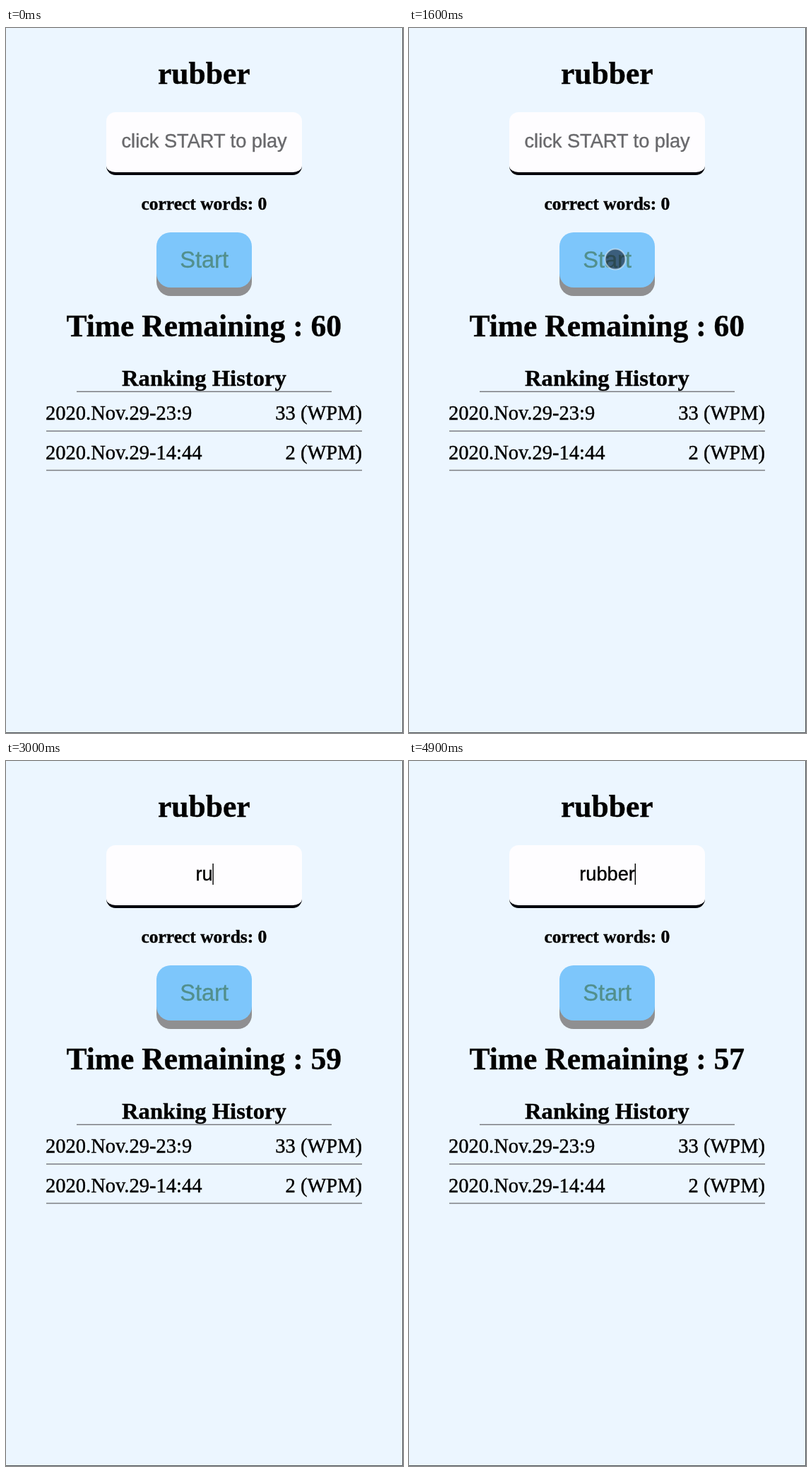
Animation of 562x997 px, one loop 5 s. Source, as an HTML page:

```html
<!DOCTYPE html>
<html lang="en">
<head>
<meta charset="utf-8">
<title>Typing game</title>
<style>
  html, body { margin: 0; width: 100%; height: 100%; overflow: hidden; background: #ecf6ff; }
  div, svg { position: absolute; box-sizing: border-box; }
  svg { left: 0; top: 0; }
  #field { left: 142px; top: 119px; width: 277px; height: 89px; border-radius: 13px;
    background: #fefdff; border-bottom: 4px solid #000008; }
  #button { left: 213px; top: 289px; width: 135px; height: 78px; border-radius: 20px;
    background: #7dc6fb; box-shadow: 0 12px #8f8f91; }
  #button.pressed { transform: translateY(5.4px); box-shadow: 0 6.6px #666; }
  text { font-family: "Liberation Serif", "Times New Roman", serif;
    fill: currentColor; stroke: currentColor; stroke-width: .4; }
  .bold { font-weight: bold; }
  .mid { text-anchor: middle; }
  .end { text-anchor: end; }
  .sans { font-family: "Liberation Sans", Arial, sans-serif; }
  .row { font-size: 28.5px; }
  .rule { stroke: #7c7e82; stroke-width: 1.4; }
</style>
</head>
<body>
<div id="field"></div>
<div id="button"></div>
<svg width="562" height="997" viewBox="0 0 562 997">
  <text class="bold mid" x="280.3" y="78.7" font-size="43.5">rubber</text>
  <text class="sans mid" id="typed" x="280.6" y="169.3" font-size="27.2"></text>
  <rect id="caret" width="1.4" height="30"/>
  <text class="bold mid" x="280.4" y="257" font-size="25.5">correct words: 0</text>
  <text class="sans mid" id="label" x="280.6" y="339" font-size="32.6" color="#528f8c">Start</text>
  <text class="bold mid" id="timer" x="280.3" y="436.2" font-size="43.5"></text>
  <text class="bold mid" x="280.4" y="505.7" font-size="32.6">Ranking History</text>
  <path class="rule" d="M100 514.2H461M57 570H504M57 625.5H504"/>
  <g class="row">
    <text x="56" y="553.6">2020.Nov.29-23:9</text>
    <text class="end" x="504" y="553.6">33 (WPM)</text>
    <text x="56" y="609.6">2020.Nov.29-14:44</text>
    <text class="end" x="504" y="609.6">2 (WPM)</text>
  </g>
  <path d="M561.5 0V996.5H0" fill="none" stroke="#505458"/>
  <path id="arrow" d="M1 1V19.5L5.2 15.8 8.6 23.5 11.6 22.2 8.3 14.6H14Z"
    stroke="#fff" stroke-width="2.4" stroke-linejoin="round" paint-order="stroke"/>
  <circle id="touch" r="14.5" fill="#141e2d" fill-opacity=".62" stroke="#d8ecfa" stroke-opacity=".6" stroke-width="2"/>
</svg>
<script>
const $ = id => document.getElementById(id);
const [typed, caret, label, timer, arrow, touch, button] =
  ["typed", "caret", "label", "timer", "arrow", "touch", "button"].map($);

const LOOP = 5000, STEP = 100;
const WORD = "rubber";
const KEY_TIMES = [2500, 2900, 3300, 3400, 3600, 3700];
const TICKS = [2700, 3700, 4700];
const CARET_TOGGLES = [1800, 2200, 2500, 4200, 4700];

const passed = (times, t) => times.filter(time => t >= time).length;
const show = (el, on) => el.setAttribute("visibility", on ? "visible" : "hidden");
const within = (t, from, to) => t >= from && t < to;

function render(now) {
  const t = Math.floor(now % LOOP / STEP) * STEP;

  const count = passed(KEY_TIMES, t);
  typed.textContent = count ? WORD.slice(0, count) : "click START to play";
  typed.setAttribute("color", count ? "#000" : "#69696c");
  const halfWidth = count ? typed.getComputedTextLength() / 2 : 0;
  caret.setAttribute("x", 280.3 + halfWidth);
  caret.setAttribute("y", count ? 145 : 146);
  show(caret, passed(CARET_TOGGLES, t) % 2);

  timer.textContent = `Time Remaining : ${60 - passed(TICKS, t)}`;

  // The pointer slows down towards the button.
  const left = 1 - Math.min(Math.max((t - 100) / 900, 0), 1);
  const move = `translate(${292 + 187 * left ** 2.1} ${327 + 119 * left ** 2.55})`;
  arrow.setAttribute("transform", move);
  touch.setAttribute("transform", move);
  show(arrow, within(t, 100, 700));
  show(touch, within(t, 700, 2500));

  const pressed = within(t, 1300, 1500);
  button.classList.toggle("pressed", pressed);
  label.setAttribute("y", pressed ? 344.4 : 339);
}

function frame() {
  render(performance.now());
  requestAnimationFrame(frame);
}
frame();
</script>
</body>
</html>
```
